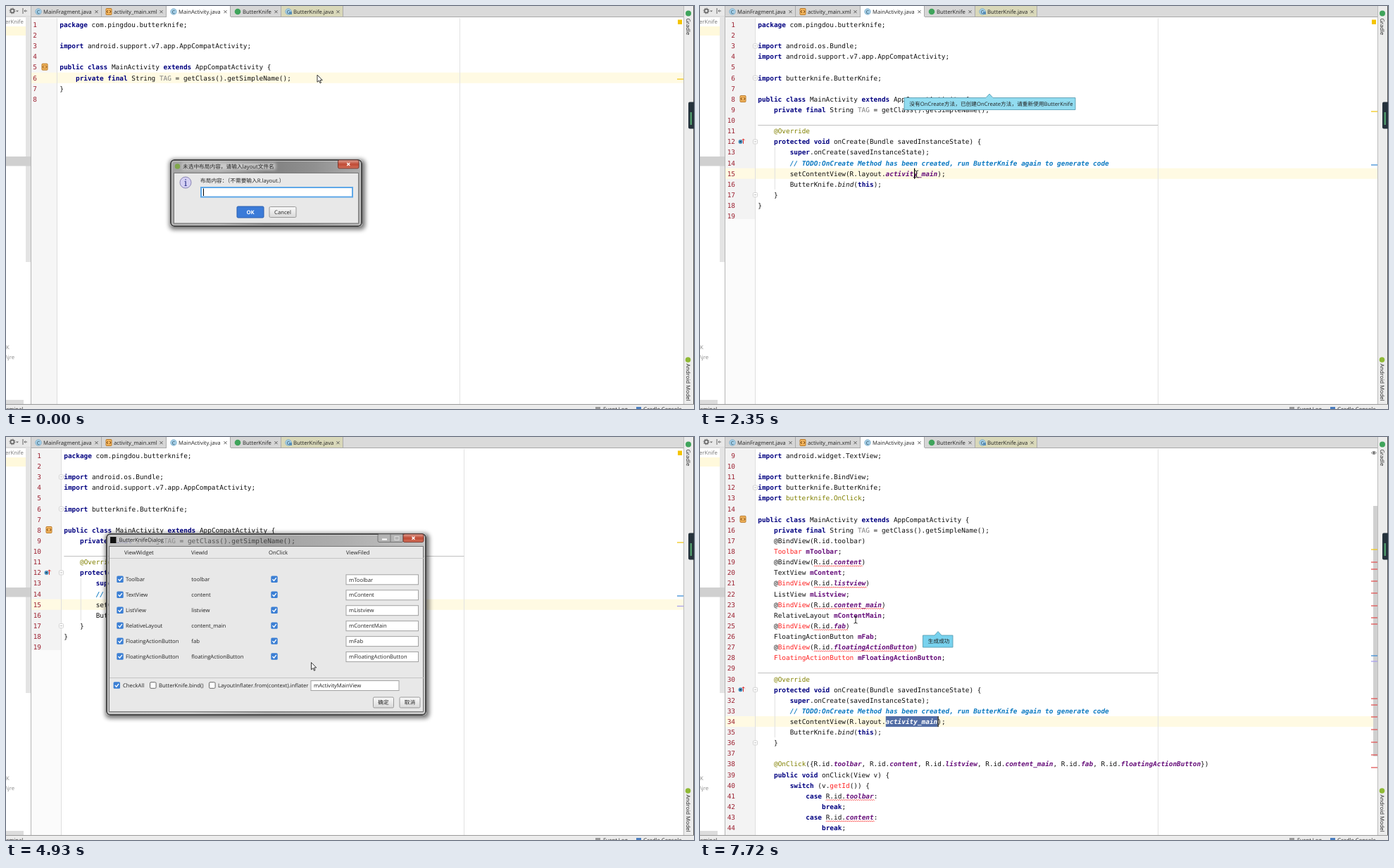
Recreate the animation shown at these times as an HTML page. Size 977 by 573 pixels, loop 8 s.

```html
<!DOCTYPE html>
<html lang="en">
<head>
<meta charset="utf-8">
<title>ButterKnife code generation</title>
<style>
html, body { margin: 0; width: 100%; height: 100%; overflow: hidden; background: #fff; }
svg { display: block; width: 100%; height: 100%; font: 7.7px "Open Sans", "Noto Sans CJK SC", "Noto Sans CJK", sans-serif; fill: #222; text-rendering: geometricPrecision; }
.code { font: 9.42px "DejaVu Sans Mono", monospace; fill: #111; }
.num { fill: #9c2030; text-anchor: end; }
.kw { fill: #000080; font-weight: bold; }
.ann { fill: #808000; }
.gray { fill: #808080; }
.com { fill: #808080; font-style: italic; }
.todo { fill: #0a78c0; font-style: italic; font-weight: bold; }
.field { fill: #660e7a; font-weight: bold; }
.stat { fill: #660e7a; font-weight: bold; font-style: italic; }
.sel { fill: #fff; font-weight: bold; font-style: italic; }
.it { font-style: italic; }
.err { fill: #f22; }
.mid { text-anchor: middle; }
</style>
</head>
<body>
<svg id="stage" viewBox="0 0 977 573" xmlns="http://www.w3.org/2000/svg"></svg>
<script>
const LOOP = 8000, ROW = 15.12, TOP = 19, CHAR = 5.672;
const stage = document.getElementById('stage');

// Drawing helpers
const rect = (x, y, w, h, fill, more = '') => `<rect x="${x}" y="${y}" width="${w}" height="${h}" fill="${fill}" ${more}/>`;
const line = (x1, y1, x2, y2, color, w = 1) => `<path d="M${x1} ${y1}L${x2} ${y2}" stroke="${color}" stroke-width="${w}" fill="none"/>`;
const dot = (x, y, r, fill, more = '') => `<circle cx="${x}" cy="${y}" r="${r}" fill="${fill}" ${more}/>`;
const label = (x, y, s, more = '') => `<text x="${x}" y="${y + 2.7}" ${more}>${s}</text>`;
const group = (id, body, more = '') => `<g id="${id}" ${more}>${body}</g>`;
const box = (x, y, w, h, fill = '#fff', stroke = '#999', r = 0) =>
  rect(x + .5, y + .5, w - 1, h - 1, fill, `stroke="${stroke}" rx="${r}"`);
const cross = (x, y, r, color, w = 1) =>
  line(x - r, y - r, x + r, y + r, color, w) + line(x - r, y + r, x + r, y - r, color, w);

// Source code of the edited class at its various stages
const widgets = [['Toolbar', 'toolbar'], ['TextView', 'content'], ['ListView', 'listview'],
  ['RelativeLayout', 'content_main'], ['FloatingActionButton', 'fab'],
  ['FloatingActionButton', 'floatingActionButton']];
const fieldName = id => 'm' + id.replace(/(^|_)(.)/g, (m, a, c) => c.toUpperCase());
const pad = (n, s) => ' '.repeat(n * 4) + s;

const pkg = ['package com.pingdou.butterknife;', ''];
const support = 'import android.support.v7.app.AppCompatActivity;';
const imports = ['import android.os.Bundle;', support, ''];
const knife = 'import butterknife.ButterKnife;';
const head = ['public class MainActivity extends AppCompatActivity {',
  pad(1, 'private final String TAG = getClass().getSimpleName();')];
const fields = widgets.flatMap(([type, id]) => [pad(1, `@BindView(R.id.${id})`), pad(1, `${type} ${fieldName(id)};`)]);
const method = ['', pad(1, '@Override'),
  pad(1, 'protected void onCreate(Bundle savedInstanceState) {'),
  pad(2, 'super.onCreate(savedInstanceState);'),
  pad(2, '// TODO:OnCreate Method has been created, run ButterKnife again to generate code'),
  pad(2, 'setContentView(R.layout.activity_main);'),
  pad(2, 'ButterKnife.bind(this);'), pad(1, '}')];
const clicks = ['', pad(1, `@OnClick({${widgets.map(w => 'R.id.' + w[1]).join(', ')}})`),
  pad(1, 'public void onClick(View v) {'), pad(2, 'switch (v.getId()) {'),
  ...widgets.flatMap(w => [pad(3, `case R.id.${w[1]}:`), pad(4, 'break;')]), pad(2, '}')];
const created = [...pkg, ...imports, ...head, ...method, '}', ''];
const imported = [...pkg, ...imports, knife, '', ...head, ...method, '}', ''];

const tokens = new RegExp(['//.*', '@(?:Override|OnClick)', '(?<=@)BindView', 'butterknife\\.OnClick',
  '\\b(?:package|import|public|class|extends|private|final|protected|void|super|this|switch|case|break)\\b',
  '\\bTAG\\b', 'activity_main', '(?<=R\\.id\\.)\\w+', '\\bm[A-Z]\\w+', '(?<=Knife\\.)bind', 'getId',
  '^Toolbar', '^FloatingActionButton(?= mFl)'].join('|'), 'g');

// level: 0 = unresolved, 1 = resolved, 2 = errors reported
function tokenClass(m, s, level, selected) {
  if (m.startsWith('//')) return level ? 'todo' : 'com';
  if (m === '@Override') return 'ann';
  if (m === 'TAG') return 'gray';
  if (m === 'activity_main') return selected ? 'sel' : level ? 'stat' : '';
  if (m === 'bind') return level ? 'it' : '';
  const late = level > 1;
  if (/OnClick$/.test(m)) return late ? 'ann' : '';
  if (m === 'BindView') return late && !/\.(toolbar|content)\)/.test(s) ? 'err' : '';
  if (/^(getId|Toolbar|FloatingActionButton)$/.test(m)) return late ? 'err' : '';
  if (s.includes('R.id.' + m)) return late && s !== '@BindView(R.id.toolbar)' ? 'stat' : '';
  if (/^m[A-Z]/.test(m)) return late ? 'field' : '';
  return 'kw';
}
const paint = (s, level, selected) => s.replace(tokens, m => {
  const c = tokenClass(m, s, level, selected);
  return c ? `<tspan class="${c}">${m}</tspan>` : m;
});

function wave(x, y, w) {
  let d = `M${x} ${y}`;
  for (let i = 0; i < w / 3; i++) d += 'l1.5 -1.5l1.5 1.5';
  return `<path d="${d}" stroke="#f33" stroke-width=".8" fill="none"/>`;
}
const xmlIcon = (x, y) => box(x - 4.5, y - 5, 9, 10, '#f2b45c', '#b97a2a', 1) +
  `<path d="M${x - 1} ${y - 2}l-2 2l2 2m2 -4l2 2l-2 2" stroke="#7a4510" fill="none"/>`;
const classIcon = (x, y, fill = '#a5cfe8') => dot(x, y, 4.3, fill, 'stroke="#6a9fc0" stroke-width=".6"') +
  label(x, y, 'C', 'class="mid" font-size="7" fill="#245"');

function view(id, o) {
  const { lines, first = 1, level = 0, current, gutter = 78, folds = [], marks = [], selected, caret, shade = '#f6f6f6' } = o;
  const textX = gutter + 4.3, margin = gutter + 572.5;
  const rowTop = i => TOP + i * ROW;
  let out = rect(36, 17, 926, 549, '#fff') + rect(36, 17, gutter - 36, 549, shade);
  if (o.partial) out += rect(36, 303, gutter - 36, 263, '#fbfbfb');
  out += rect(36, rowTop(current - first), 926, ROW, '#fffae3');
  out += line(gutter + .5, 17, gutter + .5, 566, '#dedede') + line(margin, 17, margin, 566, '#e2e2e2');
  lines.forEach((raw, i) => {
    const s = raw.trim(), indent = raw.length - raw.trimStart().length;
    const x = textX + indent * CHAR, y = rowTop(i), mid = y + 7.6;
    out += `<text class="code num" x="${gutter - 28}" y="${y + 11}">${first + i}</text>`;
    if (s.startsWith('public class')) out += xmlIcon(gutter - 17, mid - .5);
    if (s.startsWith('protected')) {
      out += dot(gutter - 20.5, mid, 3, '#4b93c4') + dot(gutter - 20.5, mid, 1.2, '#245');
      out += `<path d="M${gutter - 16.5} ${mid + 3}v-7m-2 2l2 -2l2 2" stroke="#d33" fill="none"/>`;
      out += line(textX + 24, y + ROW, textX + 24, y + 5 * ROW, '#e0e0e0');
    }
    if (s === '@Override') {
      const edge = Math.floor(y - .8) + .5;
      out += line(textX, edge, margin, edge, '#c0c0c0');
    }
    if (folds.includes(first + i)) out += box(gutter - 3, mid - 3.5, 7, 7, '#fff', '#d2d2d2', 1) + line(gutter - 1, mid, gutter + 2, mid, '#bbb');
    const at = raw.indexOf('activity_main');
    if (selected && at > 0) out += rect(textX + at * CHAR, y, 13 * CHAR, ROW, '#526da5');
    if (s) out += `<text class="code" x="${x}" y="${y + 11}">${paint(s, level, selected)}</text>`;
    const bad = s.match(/^(?:case |@BindView\()(R\.id\.\w+)/);
    if (level > 1 && bad && s !== '@BindView(R.id.toolbar)')
      out += wave(textX + raw.indexOf('R.id') * CHAR, y + 14, bad[1].length * CHAR);
  });
  if (caret) out += rect(caret, rowTop(current - first), 1.2, ROW, '#000');
  if (o.thumb) out += rect(956, o.thumb[0], 6, o.thumb[1], '#d0d0d0');
  marks.forEach(([color, ...ys]) => ys.forEach(y => out += line(953, y, 962, y, color, 1.3)));
  out += o.eye
    ? `<path d="M953.5 22.5q3.5 -4 7 0q-3.5 4 -7 0" fill="#fff" stroke="#666" stroke-width=".9"/>` + dot(957, 22.5, 1.3, '#444')
    : rect(954, 19.5, 6, 6.5, '#f5c400');
  return group(id, out);
}

const yellow = '#f2c718', blue = '#3f8fd6', purple = '#a9a0ee', red = '#e05555';
const importedView = { lines: imported, partial: true, shade: '#f3f3f3', folds: [3, 6, 12, 17] };
const todoMarks = [[yellow, 150], [blue, 226]];
const selectedView = { ...importedView, level: 1, current: 15, caret: 337.5, selected: 1, marks: todoMarks };
const views = {
  start: { lines: [...pkg, support, '', ...head, '}', ''], gutter: 72, current: 6, marks: [[yellow, 104]] },
  created: { lines: created, current: 7, caret: 411, eye: 1, folds: [3, 4, 10, 15], marks: [[yellow, 119]] },
  imported: { ...importedView, current: 9, caret: 411, eye: 1, marks: [[yellow, 150]] },
  resolved: { ...importedView, level: 1, current: 9, caret: 411, marks: todoMarks },
  placed: { ...importedView, level: 1, current: 15, caret: 304, marks: todoMarks },
  selected: selectedView,
  marked: { ...selectedView, marks: [...todoMarks, [purple, 240.5]] },
  generated: { lines: [...fields.slice(1), ...method, ...clicks], first: 12, level: 1, current: 28, caret: 337.5, selected: 1,
    shade: '#f3f3f3', eye: 1, folds: [25, 30], thumb: [136, 354], marks: [[yellow, 116.5], [blue, 283], [purple, 292]] },
  checked: { lines: ['import android.widget.TextView;', '', 'import butterknife.BindView;', knife, 'import butterknife.OnClick;', '',
      ...head, ...fields, ...method, ...clicks].slice(0, 36), first: 9, level: 2, current: 34, caret: 337.5, selected: 1,
    shade: '#f3f3f3', eye: 1, folds: [12, 31, 36], thumb: [98, 356],
    marks: [[yellow, 160], [red, 178, 188, 205, 222, 240, 257, 266, 372, 381, 398, 416, 434, 452, 470], [blue, 311], [purple, 319]] }
};

// Window chrome around the editor
function chrome() {
  let out = rect(0, 0, 977, 16, '#dadada') + rect(0, 16, 35, 551, '#fff');
  out += rect(0, 0, 35, 14, '#e8e8e8') + dot(9, 7, 2.6, 'none', 'stroke="#666" stroke-width="1.6"');
  out += dot(9, 7, 4, 'none', 'stroke="#777" stroke-width="1" stroke-dasharray="1.5 1.6"');
  out += `<path d="M14 6.5h4l-2 2z" fill="#666"/><path d="M24 3v8m6 -4h-4m1.5 -1.5l-1.5 1.5l1.5 1.5" stroke="#666" fill="none"/>`;
  out += label(-1, 22, 'erKnife', 'fill="#777"') + rect(0, 29, 28, 13, '#fff9dc');
  out += rect(28, 15, 7, 349, '#e4e4e4') + rect(0, 214, 35, 13.5, '#d0d0d0');
  out += label(0, 485.5, 'K', 'fill="#888"') + label(0, 499, '\\jre', 'fill="#888"') + rect(0, 560, 25, 6, '#dcdcdc');
  out += line(35.5, 0, 35.5, 566, '#b5b5b5');
  const tabs = [[36, 100, 'MainFragment.java'], [136, 92, 'activity_main.xml'], [228, 91, 'MainActivity.java'],
    [319, 72, 'ButterKnife'], [391, 88, 'ButterKnife.java']];
  out += line(36, 15.5, 962, 15.5, '#a9a9a9');
  tabs.forEach(([x, w, name], i) => {
    out += rect(x, 0, w, i === 2 ? 16 : 15, ['#d6d6d6', '#d6d6d6', '#fff', '#d6d6d6', '#d9d8b9'][i]);
    out += line(x + w - .5, 0, x + w - .5, 15, '#aaa');
    const cx = x + 10;
    out += i === 1 ? xmlIcon(cx, 8) : i === 3 ? dot(cx, 8, 4.3, '#3fa45b') : classIcon(cx, 8);
    if (i === 4) out += rect(cx + 1, 8, 4, 4, '#5a8fb8');
    out += label(x + 17, 8.2, name) + cross(x + w - 7.5, 8.2, 2, '#555');
  });
  out += rect(962, 0, 15, 573, '#ececec') + line(962.5, 0, 962.5, 566, '#bbb') + line(976.5, 0, 976.5, 573, '#555');
  out += dot(969, 10.5, 4, '#3fa45b') + dot(968.5, 503, 3.8, '#8fb935');
  out += `<text transform="translate(965.5 17.5)rotate(90)">Gradle</text><text transform="translate(965.5 508.5)rotate(90)">Android Model</text>`;
  out += rect(969, 136.5, 10, 38, '#25323c', 'rx="2"') + rect(971.5, 151, 2.5, 18, '#4f9a6c');
  out += rect(0, 566, 977, 7, '#ececec') + line(0, 566.5, 977, 566.5, '#999');
  out += label(-7, 573.5, 'Terminal') + rect(837, 570, 7, 3, '#999') + label(848, 573.5, 'Event Log');
  return out + rect(895, 570, 7, 3, '#4a7ec0') + label(905, 573.5, 'Gradle Console');
}

const frame = (x, y, w, h, glass) =>
  rect(x - 1, y, w + 5, h + 4, '#000', 'rx="6" opacity=".55" filter="url(#blur)" mask="url(#out' + x + ')"') +
  rect(x + 1, y + 1, w - 2, h - 2, 'url(#glass)', `rx="5" fill-opacity="${glass}"`) +
  rect(x + 1, y + 1, w - 2, h - 2, 'none', 'rx="5" stroke="#484848" stroke-width="2"') +
  rect(x + 2.5, y + 2.5, w - 5, h - 5, 'none', 'rx="4" stroke="#ddd" stroke-opacity=".7"');
const shadowMask = (x, y, w, h) => `<mask id="out${x}" maskUnits="userSpaceOnUse" x="0" y="0" width="977" height="573">` +
  rect(0, 0, 977, 573, '#fff') + rect(x, y, w, h, '#000', 'rx="5"') + '</mask>';
const glow = (x, y, w) => rect(x, y - 5, w, 10, '#d0d0d0', 'opacity=".85" filter="url(#soft)"');
const closeButton = (x, y, w, h) => rect(x, y, w, h, 'url(#close)', 'rx="2" stroke="#6b2a22" stroke-width=".8"') +
  cross(x + w / 2, y + h / 2, 2, '#fff', 1.4);
const button = (x, y, w, h, s) => rect(x + .5, y + .5, w - 1, h - 1, 'url(#button)', 'rx="1.5" stroke="#999"') + label(x + w / 2, y + h / 2, s, 'class="mid"');
const check = (x, y, on) => on
  ? rect(x - 4.7, y - 4.7, 9.4, 9.4, '#3b7fd4', 'rx="1.5"') + `<path d="M${x - 2.5} ${y}l2 2.2l3.3 -4.4" stroke="#fff" stroke-width="1.4" fill="none"/>`
  : box(x - 4.8, y - 4.8, 9.6, 9.6, '#fff', '#666', 1.5);

function layoutPrompt() {
  let out = frame(233, 218, 273, 96, .8) + rect(238.5, 237.5, 262, 71.5, '#e8e8e8', 'stroke="#777"');
  out += glow(250, 228, 133) + dot(243.5, 228, 3.8, '#7fa64a') + label(251, 228, '未选中布局内容，请输入layout文件名') + closeButton(471.5, 219, 29.5, 12);
  out += dot(255, 251, 8, '#d5d0f3', 'stroke="#8a86b5"');
  out += `<text x="255" y="255.5" class="mid" font-family="Noto Serif, serif" font-size="13" fill="#333a90">i</text>`;
  out += label(276, 248, '布局内容：（不需要输入R.layout.）');
  out += rect(277, 258, 215, 13.5, '#fff', 'stroke="#5fa8e8" stroke-width="2"');
  out += group('typed', label(280, 264.7, 'activity_main')) + rect(280, 259.5, 1, 10.5, '#000', 'id="inputCaret"');
  out += rect(328, 285, 38, 16, '#3b7bd8', 'rx="1.5" stroke="#2b5fae"') + label(347, 293, 'OK', 'class="mid" fill="#fff" font-weight="bold"');
  return out + button(373.5, 285, 39, 16, 'Cancel');
}

function knifeDialog() {
  let out = frame(142, 137, 455, 259, .58) + rect(146.5, 155.5, 446, 235, '#e8e8e8', 'stroke="#777"');
  out += glow(148, 146.5, 77) + rect(148, 142, 8.5, 9, '#111') + label(160.5, 146, 'ButterKnifeDialog');
  out += rect(528, 138, 36, 11.5, '#b4b4b4', 'rx="2" stroke="#666" stroke-width=".8"') + line(546, 138, 546, 149.5, '#777');
  out += rect(534, 144.5, 7, 2, '#fff') + rect(552, 141.5, 6, 5, 'none', 'stroke="#ddd"') + closeButton(564, 138, 29, 11.5);
  [[168, 'ViewWidget'], [263, 'ViewId'], [373, 'OnClick'], [483, 'ViewFiled']].forEach(([x, s]) => out += label(x, 164, s));
  out += line(147, 172.5, 593, 172.5, '#c4c4c4') + line(147, 342.5, 593, 342.5, '#c4c4c4');
  widgets.forEach(([type, id], i) => {
    const y = 202.3 + i * 21.95;
    out += check(162, y, true) + label(170, y, type) + label(263.3, y, id) + check(381, y, true);
    out += box(482.5, y - 7, 103.5, 15, '#fff', '#a2a2a2') + label(487, y + .5, fieldName(id));
  });
  out += check(157.3, 353, true) + label(166, 353, 'CheckAll') + check(208.8, 353) + label(217, 353, 'ButterKnife.bind()');
  out += check(292.8, 353) + label(301, 353, 'LayoutInflater.from(context).inflater');
  out += box(432.5, 346, 126, 15, '#fff', '#a2a2a2') + label(437, 353.5, 'mActivityMainView');
  out += button(521, 369.5, 30, 16, '确定') + button(558.5, 369.5, 30, 16, '取消');
  return out + rect(521, 369.5, 30, 16, 'none', 'id="focus" rx="2" stroke="#5fa8e8" stroke-width="2"');
}

const balloon = (x, y, w, tip, s, fill) =>
  `<path d="M${x} ${y}H${tip - 5}L${tip} ${y - 5.5}L${tip + 5} ${y}H${x + w}V${y + 17}H${x}Z" fill="${fill}" stroke="#5b9fb4" stroke-width=".9"/>` +
  label(x + 7.3, y + 8.5, s);
const stops = (...colors) => colors.map((c, i) => `<stop offset="${i / (colors.length - 1)}" stop-color="${c}"/>`).join('');

stage.innerHTML = `<defs><filter id="blur" x="-20%" y="-40%" width="140%" height="180%"><feGaussianBlur stdDeviation="3"/></filter>
<filter id="soft" x="-10%" y="-60%" width="120%" height="220%"><feGaussianBlur stdDeviation="2"/></filter>
<linearGradient id="glass">${stops('#8c8c8c', '#989898', '#606060', '#747474', '#999')}</linearGradient>
<linearGradient id="close" x2="0" y2="1">${stops('#e0a294', '#c04a35', '#d2705a')}</linearGradient>
<linearGradient id="button" x2="0" y2="1">${stops('#fafafa', '#d9d9d9')}</linearGradient>
${shadowMask(233, 218, 273, 96)}${shadowMask(142, 137, 455, 259)}</defs>` +
  Object.entries(views).map(([id, o]) => view(id, o)).join('') + chrome() +
  group('created-tip', balloon(290, 130.5, 243, 411, '没有OnCreate方法，已创建OnCreate方法，请重新使用ButterKnife', '#92dcf0')) +
  group('done-tip', balloon(316.5, 282, 42.5, 338, '生成成功', '#78d2ee')) +
  group('prompt', layoutPrompt()) + group('dialog', knifeDialog()) +
  group('arrow', '<path d="M0 0V10.2L2.4 8L4 11.6L5.5 11L4 7.4H7.2Z" fill="#fff" stroke="#222" stroke-width=".9"/>') +
  group('beam', '<path d="M-2.5 -5Q0 -5 0 -3.5Q0 -5 2.5 -5M0 -4V4M-2.5 5Q0 5 0 3.5Q0 5 2.5 5" fill="none" stroke="#222"/>');

// Timeline
const bursts = [[0, 0, 1], [120, 120, 1], [420, 1390, 8], [1560, 2480, 8], [2620, 2890, 3], [3170, 3410, 3],
  [3860, 4800, 8], [4930, 5890, 8], [6010, 6990, 8], [7140, 7440, 3], [7720, 7720, 1]];
const cuts = [[0, 'start'], [1105, 'created'], [1810, 'imported'], [2080, 'resolved'], [2340, 'placed'],
  [2745, 'selected'], [3400, 'marked'], [6140, 'generated'], [7720, 'checked']];
const path = [[420, 442, 98], [836, 345, 289], [1390, 315, 239], [2220, 315, 239], [2480, 300, 239], [3050, 300, 239],
  [3410, 389, 250], [3860, 389, 250], [4128, 410, 307], [4800, 410, 307], [5480, 533, 378], [5890, 533, 378],
  [6430, 304, 258], [7040, 304, 258], [7440, 221, 260]];
const clamp = v => Math.max(0, Math.min(1, v));
const $ = id => document.getElementById(id);
const show = (id, on) => { $(id).style.display = on ? '' : 'none'; };
const fade = (id, a) => { show(id, a > 0); $(id).setAttribute('opacity', a); };

function snap(t) {
  const [start, end, n] = bursts.filter(b => b[0] <= t).pop();
  if (n < 2) return start;
  const step = (end - start) / (n - 1);
  return start + step * Math.min(n - 1, Math.floor((t - start + 12) / step));
}
function pointer(t) {
  const i = path.findIndex(p => p[0] > t);
  if (i < 1) return (i < 0 ? path[path.length - 1] : path[0]).slice(1);
  const [t0, x0, y0] = path[i - 1], [t1, x1, y1] = path[i], k = (t - t0) / (t1 - t0);
  return [x0 + (x1 - x0) * k, y0 + (y1 - y0) * k];
}
function zoom(id, cx, cy, open) {
  fade(id, open);
  const s = .8 + .2 * open;
  $(id).setAttribute('transform', `translate(${cx} ${cy})scale(${s})translate(${-cx} ${-cy})`);
}

function render(time) {
  const t = snap(time);
  const current = cuts.filter(c => c[0] <= t).pop()[1];
  Object.keys(views).forEach(id => show(id, id === current));
  show('typed', t >= 120);
  $('inputCaret').setAttribute('x', t < 120 ? 280 : 326);
  zoom('prompt', 369.5, 266, clamp(1 - (t - 850) / 250));
  const opening = 1 - (1 - clamp((t - 3800) / 385)) ** 2;
  zoom('dialog', 369.5, 266, t < 3860 ? 0 : Math.min(opening, clamp(1 - (t - 5760) / 250)));
  show('focus', t >= 5600);
  fade('created-tip', Math.min(clamp((t - 1050) / 300), clamp((2870 - t) / 370)));
  fade('done-tip', clamp((t - 6600) / 300));
  const [x, y] = pointer(t), arrow = t < 1105 || (t >= 3990 && t < 5600);
  show('arrow', arrow);
  show('beam', !arrow);
  $(arrow ? 'arrow' : 'beam').setAttribute('transform', `translate(${x} ${y})`);
}

const origin = performance.now();
function tick() {
  render((performance.now() - origin) % LOOP);
  requestAnimationFrame(tick);
}
tick();
</script>
</body>
</html>
```
